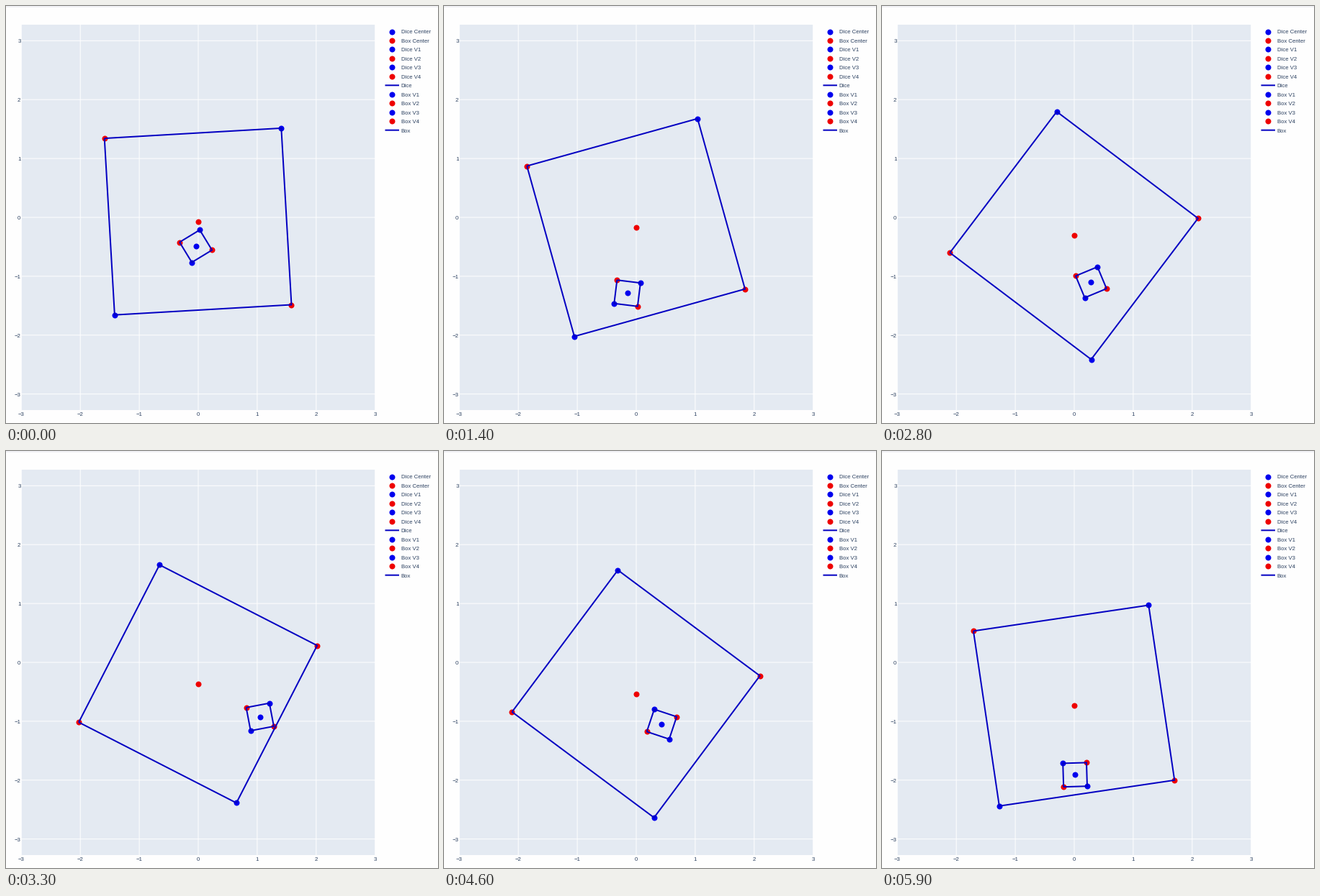
Animation, 600 px wide and 580 px high, one loop 6000 ms. Source, as a matplotlib script:

```python
import numpy as np
import matplotlib.pyplot as plt
from matplotlib.animation import FuncAnimation
from matplotlib.patches import Rectangle

W, H, DPI = 600, 580, 100
FRAMES, STEP = 60, 100
PT = 72 / DPI
BLUE, RED, LINE = "#0000ee", "#ee0000", "#0300c2"
PANEL, INK = "#e4eaf2", "#2a3f5f"
UNIT, MID_X, MID_Y = 81.9, 267, 294
BOX_SIDE, DICE_SIDE = 246, 32.8
GRAVITY = 66.7

# The box swings smoothly through these angles
SWING_T = [0, 0.7, 2, 2.8, 3.8, 4.6, 5.9]
SWING = [3.3, 7.4, 27.5, 52.9, 66.2, 53.3, 8.4]
SWING_SPEED = np.gradient(SWING, SWING_T)

# The dice flies freely between these points: time, x, y, angle
FLIGHTS = np.array([
    (0, 263.6, 334, 31.3),
    (1.6, 253.3, 419.5, -12.5),
    (2.28, 215.6, 418, 20.6),
    (3.26, 356.6, 369.5, 363.6),
    (3.8, 305, 383.7, 460.6),
    (4.6, 302.4, 380, 431.6),
    (5.9, 268.1, 450.3, 451.7),
])


def locate(times, t):
    """Index, length and progress of the interval that holds t."""
    i = min(np.searchsorted(times, t, side="right"), len(times) - 1) - 1
    h = times[i + 1] - times[i]
    return i, h, (t - times[i]) / h


def box_pose(t):
    i, h, s = locate(SWING_T, t)
    a, b = SWING[i:i + 2]
    va, vb = SWING_SPEED[i:i + 2] * h
    ease = s * s * (3 - 2 * s)
    angle = a + (b - a) * ease + s * (1 - s) * (va * (1 - s) - vb * s)
    return MID_X - 0.4, 299.8 + 4.9 * t + 0.73 * t * t, angle


def dice_pose(t):
    i, h, s = locate(FLIGHTS[:, 0], t)
    x, y, angle = FLIGHTS[i, 1:] + (FLIGHTS[i + 1, 1:] - FLIGHTS[i, 1:]) * s
    return x, y - GRAVITY / 2 * h * h * s * (1 - s), angle


def corners(pose, side):
    """Corners clockwise from the upper left, first one repeated at the end."""
    x, y, angle = pose
    a = np.radians(angle + 135 - 90 * np.arange(5))
    r = side / np.sqrt(2)
    return x + r * np.cos(a), y - r * np.sin(a)


fig = plt.figure(figsize=(W / DPI, H / DPI), dpi=DPI, facecolor="#fefefe")
ax = fig.add_axes([0, 0, 1, 1])
ax.set_xlim(0, W)
ax.set_ylim(H, 0)
ax.axis("off")


def label(x, y, text, ha):
    ax.text(x, y + 2.9, text, ha=ha, va="baseline", color=INK,
            family="Liberation Sans", fontsize=7.8 * PT)


def dots(color, z, x=(), y=()):
    return ax.plot(x, y, "o", color=color, ms=8 * PT, mew=0, zorder=z, snap=False)[0]


def stroke(z, x=(), y=(), color=LINE, width=2):
    return ax.plot(x, y, color=color, lw=width * PT, zorder=z, snap=False,
                   solid_joinstyle="round", solid_capstyle="butt")[0]


ax.add_patch(Rectangle((0, 0), W, 1.5, color="#f1f1f5", lw=0))
ax.add_patch(Rectangle((21.3, 26), 492, 536, color=PANEL, lw=0))
for v in range(-3, 4):
    gx, gy = MID_X + UNIT * v, MID_Y - UNIT * v
    name = str(v).replace("-", "\u2212")
    stroke(1, [gx, gx], [26, 562], "white", 1)
    stroke(1, [21.3, 513.3], [gy, gy], "white", 1)
    label(gx, 567.5, name, "center")
    label(20.5, gy, name, "right")

entries = ["Dice Center", "Box Center"]
for body in ("Dice", "Box"):
    entries += [f"{body} V{k}" for k in range(1, 5)] + [body]
for i, name in enumerate(entries):
    y = 35.5 + 12.47 * i
    if name in ("Dice", "Box"):
        stroke(3, [526.5, 546], [y, y])
    else:
        dots(RED if name[-1] in "24" or name == "Box Center" else BLUE, 3, [536], [y])
    label(548.8, y, name, "left")

dice_center, box_center = dots(BLUE, 3), dots(RED, 3)
bodies = [
    (dice_pose, DICE_SIDE, dice_center, dots(RED, 4), dots(BLUE, 4), stroke(5)),
    (box_pose, BOX_SIDE, box_center, dots(RED, 6), dots(BLUE, 6), stroke(7)),
]


def draw(n):
    t = n * STEP / 1000
    changed = []
    for pose_at, side, center, reds, blues, outline in bodies:
        pose = pose_at(t)
        x, y = corners(pose, side)
        center.set_data([pose[0]], [pose[1]])
        reds.set_data(x[:4:2], y[:4:2])
        blues.set_data(x[1:4:2], y[1:4:2])
        outline.set_data(x, y)
        changed += [center, reds, blues, outline]
    return changed


anim = FuncAnimation(fig, draw, frames=FRAMES, interval=STEP, repeat=True, repeat_delay=0)
plt.show()
```
